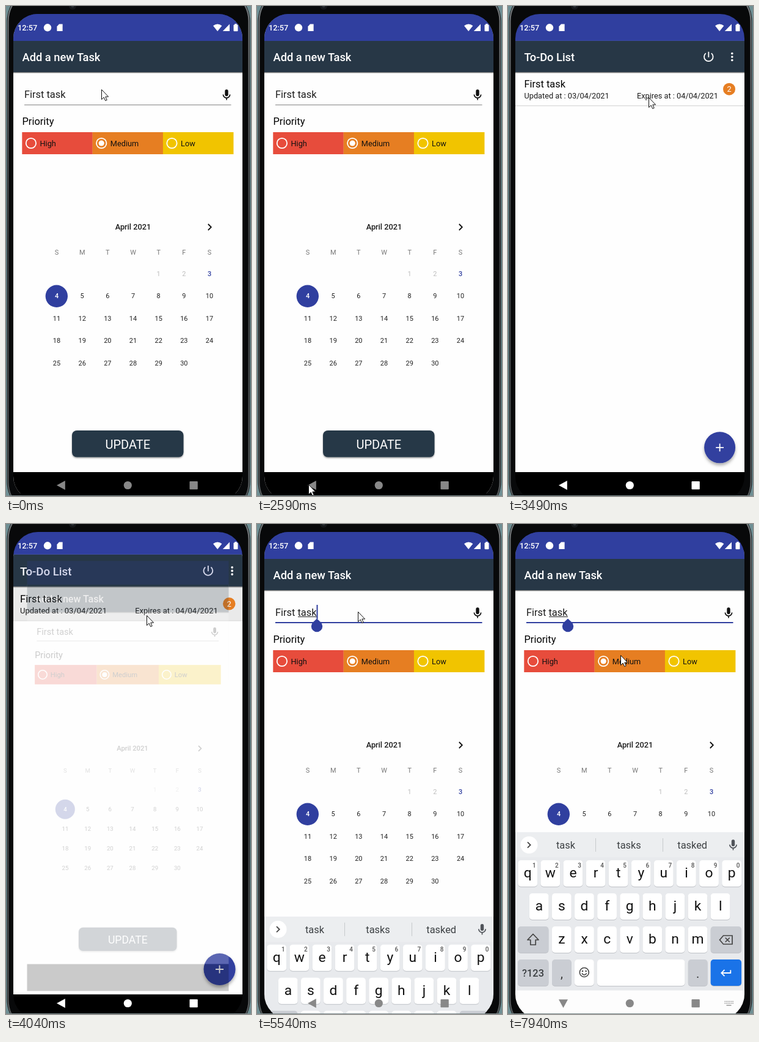
Recreate the animation shown at these times as an HTML page. Size 401 by 800 pixels, loop 8000 ms.

```html
<!DOCTYPE html>
<html lang="en">
<head>
<meta charset="utf-8">
<title>To-Do List</title>
<style>
  html, body { margin: 0; width: 100%; height: 100%; overflow: hidden; background: #08090a; }
  svg { display: block; width: 401px; height: 800px; font-family: Roboto, sans-serif; }
</style>
</head>
<body>
<svg id="stage" viewBox="0 0 401 800"></svg>
<script>
const INDIGO = '#303f9f', SLATE = '#273746', KEY_GRAY = '#cacdd3', INK = '#1c1c1c';
const MEDIUM = 'font-weight="500"';

// Markup helpers
const rect = (x, y, w, h, color, more = '') =>
  `<rect x="${x}" y="${y}" width="${w}" height="${h}" fill="${color}" ${more}/>`;
const circle = (x, y, r, color, more = '') => `<circle cx="${x}" cy="${y}" r="${r}" fill="${color}" ${more}/>`;
const fill = (d, color) => `<path d="${d}" fill="${color}"/>`;
const line = (d, color, width, more = '') =>
  `<path d="${d}" fill="none" stroke="${color}" stroke-width="${width}" ${more}/>`;
const text = (x, y, size, str, color = INK, more = '') =>
  `<text x="${x}" y="${y}" font-size="${size}" fill="${color}" ${more}>${str}</text>`;
const label = (x, y, size, str, color, more = '') =>
  text(x, y, size, str, color, `text-anchor="middle" ${more}`);
const group = (id, body) => `<g id="${id}">${body}</g>`;

const mic = (x, y, color) => `<g transform="translate(${x} ${y})">` +
  rect(-2.7, -8.7, 5.4, 11, color, 'rx="2.7"') +
  line('M-5.6-.5A5.6 5.6 0 0 0 5.6-.5M0 5V8.6', color, 1.7) + '</g>';

const page = title =>
  rect(12, 13, 375, 44.5, INDIGO) + rect(12, 57, 375, 704, '#fefefe') +
  rect(12, 108, 375, 1, '#000', 'opacity=".5"') + rect(12, 109, 375, 1, '#000', 'opacity=".2"') +
  rect(12, 57, 375, 51, SLATE) + rect(12, 761, 375, 50, '#000') +
  text(26.5, 90, 18.3, title, '#fff', MEDIUM);

function listPage() {
  return page('To-Do List') +
    line('M323.8 77.2A7.3 7.3 0 1 0 332.8 77.2M328.3 74.7V83.8', '#fff', 1.8) +
    [-5.5, 0, 5.5].map(dy => circle(366.8, 83 + dy, 1.8, '#fff')).join('') +
    rect(12, 162, 375, 1, '#dedede') + rect(12, 163, 375, 1, '#ededed') +
    group('pressed', rect(12, 109, 375, 53, '#000', 'opacity=".08"')) +
    text(26.5, 133.5, 16.4, 'First task', '#000') +
    text(26.5, 151.5, 12.76, 'Updated at : 03/04/2021') +
    text(211, 151.5, 12.76, 'Expires at : 04/04/2021') +
    circle(362, 135.7, 10, '#e67e22') + label(362, 140.2, 12.76, '2', '#fff') +
    circle(346.6, 720.8, 25.5, INDIGO, 'filter="url(#lift)"') +
    line('M340.2 720.8H353M346.6 714.4V727.2', '#fff', 1.8);
}

function calendar() {
  const column = i => 83 + i * 41.67;
  let out = label(208, 365.4, 12.76, 'April 2021', INK, MEDIUM) +
    line('M330.8 356L335.8 361L330.8 366', '#111', 1.8);
  [...'SMTWTFS'].forEach((d, i) => out += label(column(i), 406.4, 10.94, d, '#777'));
  out += circle(82.8, 473.8, 18.2, INDIGO);
  for (let day = 1; day <= 30; day++) {
    const cell = day + 3;
    const color = day < 3 ? '#bdbdbd' : day === 3 ? INDIGO : day === 4 ? '#fff' : '#222';
    out += label(column(cell % 7), 441 + Math.floor(cell / 7) * 36.46, 10.94, day, color,
      day === 3 || day === 4 ? MEDIUM : '');
  }
  return out;
}

function editPage() {
  const radios = [['High', '#e74c3c'], ['Medium', '#e67e22'], ['Low', '#f1c400']].map(([name, color], i) => {
    const x = 26.3 + i * 115.3;
    return rect(x, 206, 115.5, 36, color) +
      circle(x + 14.6, 224, 8.2, 'none', 'stroke="#fff" stroke-width="1.8"') +
      (i === 1 ? circle(x + 14.6, 224, 4.6, '#fff') : '') +
      text(x + 29.2, 228.7, 12.76, name, '#111');
  }).join('');
  return page('Add a new Task') +
    text(30, 150, 16.4, 'First task') + mic(361, 145, '#111') +
    group('idleLine', rect(30, 161, 338.5, 1, '#868686')) +
    group('focus', rect(30, 160, 338.5, 2, INDIGO) +
      fill('M98 154.5L104.5 160.6A9.2 9.2 0 1 1 91.5 160.6Z', INDIGO)) +
    group('composing', rect(67, 151, 31, 1, '#222')) +
    group('caret', rect(97.5, 132, 2, 23, INDIGO)) +
    text(26.5, 193.6, 16.4, 'Priority', '#000') + radios + calendar() +
    rect(108, 693, 182.5, 43.5, SLATE, 'rx="8" filter="url(#flat)"') +
    label(199.3, 722.6, 20.05, 'UPDATE', '#fff');
}

function keyboard() {
  const key = (x, y, w, color) => rect(x, y + 1, w, 43, '#bfc2c7', 'rx="5"') + rect(x, y, w, 43, color, 'rx="5"');
  let out = rect(12, 503.5, 375, 259, '#e8eaed') + rect(12, 503.5, 375, 41, '#eceef0') +
    rect(12, 761.5, 375, 50, '#fdfdfd') +
    circle(34.5, 524, 14, '#fff') + line('M32 519.3L36.7 524L32 528.7', '#444', 1.8) +
    rect(143, 513, 1, 22, '#c6c9cc') + rect(253, 513, 1, 22, '#c6c9cc') + mic(368.5, 524, '#50545a');
  ['task', 'tasks', 'tasked'].forEach((word, i) => out += label(94.5 + i * 103.6, 530, 16.4, word, '#3c4043'));
  ['qwertyuiop', 'asdfghjkl', 'zxcvbnm'].forEach((row, r) =>
    [...row].forEach((ch, i) => {
      const x = 199.2 + (i - row.length / 2) * 37.1 + 2.6, y = 549 + r * 54;
      out += key(x, y, 31.8, '#fff') + label(x + 16, y + 28.4, 22.8, ch, '#111');
      if (r === 0) out += label(x + 26.5, y + 11.6, 10, (i + 1) % 10, '#555', MEDIUM);
    }));
  return out +
    key(16, 657, 50.4, KEY_GRAY) + key(331.7, 657, 50.4, KEY_GRAY) +
    line('M41 669.5L50 679H45.2V687H36.8V679H32Z', '#444', 1.7, 'stroke-linejoin="round"') +
    line('M352.5 672H367V686H352.5L346.5 679ZM355.7 675.5L362.7 682.5M362.7 675.5L355.7 682.5', '#444', 1.7) +
    key(16, 711, 50.4, KEY_GRAY) + label(41, 738.5, 16.4, '?123', '#3c4043', MEDIUM) +
    key(72, 711, 31.8, KEY_GRAY) + label(88, 741, 20, ',', '#333') +
    key(109, 711, 31.8, '#fff') + circle(124.8, 732, 7.5, 'none', 'stroke="#444" stroke-width="1.6"') +
    circle(122, 730, 1.3, '#444') + circle(127.6, 730, 1.3, '#444') +
    line('M120.8 733.5Q124.8 739 128.8 733.5', '#444', 1.6) +
    key(146, 711, 143.5, '#fff') +
    key(294.8, 711, 31.8, KEY_GRAY) + label(310.7, 741, 20, '.', '#333') +
    key(331.7, 711, 50.4, '#1a73e8') +
    line('M364.3 728.2V733H349.6M354.4 727.9L349.3 733L354.4 738.1', '#fff', 1.8) +
    line('M354.5 779.5H369M354.5 782.5H369', '#999', 1.6, 'stroke-dasharray="1.6 1"') +
    rect(357.5, 785, 8, 1.5, '#999');
}

const statusIcons =
  text(19, 40.2, 12.76, '12:57', '#fff', MEDIUM) + circle(68, 35.3, 6.2, '#fff') +
  fill('M87 29.6H92.6V41H83.4V33.4Z', '#fff') +
  fill('M346.2 41.2L339 32.2Q346.2 26.8 353.4 32.2Z', '#fff') + fill('M366 29.6V41H354.8Z', '#fff') +
  rect(372.5, 30.4, 7, 10.8, '#fff', 'rx="1"') + rect(374.4, 29, 3.2, 2, '#fff');

const navIcons = '<path id="back" d="M83 782.5L96.8 775V790Z"/>' +
  '<circle cx="199.3" cy="782.5" r="6.6"/><rect x="300.5" y="776" width="13.3" height="13.3" rx="1"/>';

const phone = rect(0, 0, 401, 800, '#6f8f94') +
  rect(1.5, -30, 398, 862, '#1a1c1d', 'rx="55"') +
  rect(3.5, -28, 394, 858, '#08090a', 'rx="53" stroke="url(#metal)" stroke-width="2"') +
  circle(109, 0, 6, '#15171a') + circle(109, 0, 2.5, '#2c3034');

const shadow = (id, dy, blur, opacity) => `<filter id="${id}" x="-30%" y="-30%" width="160%" height="160%">
  <feDropShadow dx="0" dy="${dy}" stdDeviation="${blur}" flood-opacity="${opacity}"/></filter>`;

document.getElementById('stage').innerHTML = `<defs>
  <clipPath id="screen"><rect x="12" y="13" width="375" height="795" rx="40"/></clipPath>
  <linearGradient id="metal" x2="0" y2="1"><stop stop-color="#7b8083"/><stop offset=".5" stop-color="#3c4042"/>
    <stop offset="1" stop-color="#5c6163"/></linearGradient>
  ${shadow('lift', 3.5, 2.6, .32)}${shadow('flat', 1.5, 1, .4)}</defs>
  ${phone}<g clip-path="url(#screen)">${group('list', listPage())}${group('edit', editPage())}
  ${group('keys', keyboard())}${statusIcons}${group('nav', navIcons)}</g>
  ${rect(0, 799, 401, 1, '#7f8d8f')}
  <path id="mouse" d="M.5.5V16.6L4.2 13.1L6.7 18.6L9.2 17.5L6.8 12.1H11.6Z" fill="#fff" stroke="#111"/>`;

const LOOP = 8000, TICK = 134.3, FIRST_TICK = 128.5;
const CLOSE = 19, OPEN = 29, FOCUS = 38, KEYBOARD = 39;

// Where the pointer turns or rests: tick, x, y
const turns = [[4, 156, 136], [5, 167, 153], [8, 171, 153], [10, 191, 226], [11, 221, 332], [12, 259, 529],
  [16, 84, 781], [18, 84, 781], [20, 147, 616], [24, 222, 161], [25, 230, 149], [29, 230, 149],
  [32, 197, 282], [33, 115, 576], [34, 136, 334], [36, 155, 162], [37, 165, 143], [40, 165, 143],
  [42, 189, 217], [49, 189, 217], [50, 184, 214]];

const clamp = v => Math.min(1, Math.max(0, v));
const $ = id => document.getElementById(id);
const show = (id, on) => $(id).setAttribute('visibility', on ? 'visible' : 'hidden');
const move = (id, transform) => $(id).setAttribute('transform', transform);
const zoom = (id, s, cy) => move(id, `translate(199.5 ${cy}) scale(${s}) translate(-199.5 ${-cy})`);

function pointer(tick) {
  const next = turns.findIndex(p => p[0] > tick);
  if (next < 1) return turns.at(next).slice(1);
  const [t0, x0, y0] = turns[next - 1], [t1, x1, y1] = turns[next];
  const u = (tick - t0) / (t1 - t0);
  return [x0 + (x1 - x0) * u, y0 + (y1 - y0) * u];
}

function render() {
  const t = performance.now() % LOOP;
  const tick = Math.floor((t - FIRST_TICK) / TICK);
  const closing = tick < OPEN, since = tick - (closing ? CLOSE : OPEN);

  zoom('list', 1 + (closing ? Math.min(.1, .2 * .3 ** since) : .02 * clamp(since / 2) + .02), 411);
  zoom('edit', closing ? Math.min(1, .99 - .03 * since) : 1 - .12 * .33 ** since, 407);
  $('edit').setAttribute('opacity', clamp(closing ? 1 - .64 * since : .2 + .6 * since));
  show('pressed', tick >= OPEN - 1);

  const focused = tick >= FOCUS;
  show('idleLine', !focused);
  show('focus', focused);
  show('composing', tick > KEYBOARD);
  show('caret', focused && (t + 560) % 1000 < 500);
  show('keys', tick > KEYBOARD);
  move('keys', `translate(0 ${310 * (1 - clamp((tick - KEYBOARD) / 3)) ** 2})`);

  $('nav').setAttribute('fill', tick >= CLOSE && !focused ? '#fff' : '#888');
  move('back', `rotate(${-90 * clamp((tick - KEYBOARD - 3) / 2)} 90.5 782.5)`);
  move('mouse', `translate(${pointer(tick).join(' ')})`);
  requestAnimationFrame(render);
}
render();
</script>
</body>
</html>
```
